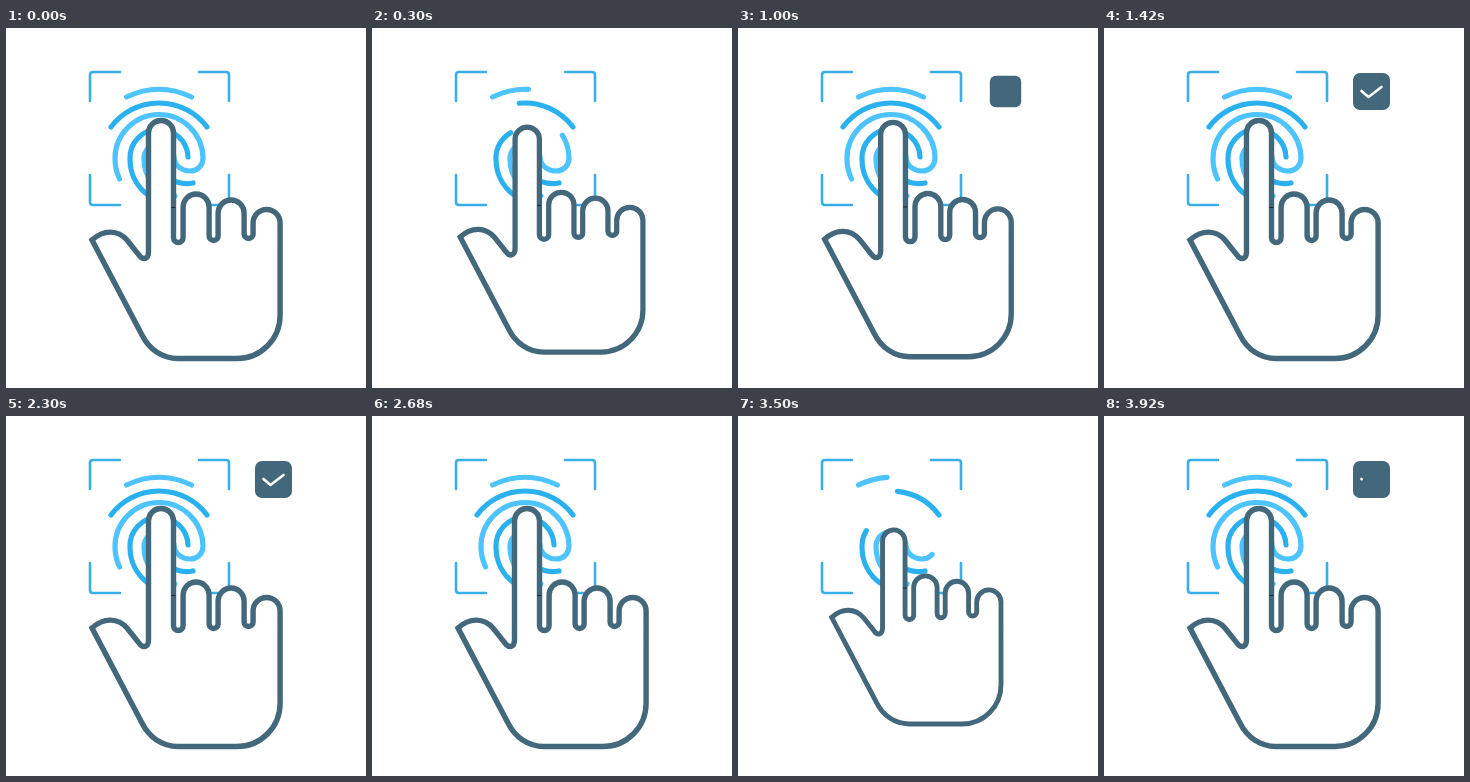
Recreate the animation shown at these times as an HTML page. Size 360 px wide and 360 px high, loop 3.94 s.

```html
<!DOCTYPE html>
<html lang="en">
<head>
<meta charset="utf-8">
<title>Fingerprint scan</title>
<style>
  html, body { margin: 0; width: 100%; height: 100%; overflow: hidden; background: #fff; }
  svg { display: block; width: 100vw; height: 100vh; }
  path { fill: none; stroke-linecap: round; stroke-linejoin: round; }
  #frame { stroke: #3aaee8; stroke-width: 2.6; }
  #print path { stroke-width: 5.2; }
  .light { stroke: #4dc3ff; }
  .dark { stroke: #2bb1f0; }
  #outline { fill: #fff; stroke: #43687b; stroke-width: 5.4; stroke-linejoin: miter; }
  #badge rect { fill: #43687b; }
  #check { stroke: #fff; stroke-width: 2.6; }
</style>
</head>
<body>
<svg viewBox="0 0 360 360">
  <path id="frame" d="M84 73V47q0-3 3-3H114M193 44H220q3 0 3 3V73M84 147V174q0 3 3 3H114M193 177H220q3 0 3-3V147"/>
  <g id="print">
    <path class="trim light" pathLength="1" d="M120.500 69Q153 53.500 185.500 69"/>
    <path class="trim dark" pathLength="1" d="M201 99A60 60 0 0 0 105 99"/>
    <path class="trim light" pathLength="1" d="M169 168C150 162 138 150 138 131A15 15 0 0 1 168 130C169 138 176 143 184 143C192 143 197 137 197 130A44 44 0 0 0 109 131Q109 141 113.500 151"/>
    <path class="trim dark" pathLength="1" d="M142 167C131 159 124 146 124 131A29 29 0 0 1 182 129"/>
    <path class="trim dark" pathLength="1" d="M187 155C170 158 153 148 153 130"/>
  </g>
  <g id="hand">
    <path id="outline"/>
    <path d="M165.500 179.500h3.500" stroke="#1d2b33" stroke-width="1"/>
  </g>
  <g id="badge">
    <rect x="249" y="45" width="37" height="37" rx="7"/>
    <path id="check" class="check" pathLength="1" d="M257.500 63L264.500 69L277.500 59"/>
  </g>
</svg>
<script>
const LOOP = 3940, CYCLE = 2860;
const $ = id => document.getElementById(id);
const trims = document.querySelectorAll('.trim');

// Smooth 0..1 progress between two times
function ease(t, start, end) {
  const u = Math.min(1, Math.max(0, (t - start) / (end - start)));
  return u * u * (3 - 2 * u);
}

function trim(path, amount) {
  path.style.visibility = amount > 0.002 ? 'visible' : 'hidden';
  path.style.strokeDasharray = amount > 0.999 ? 'none' : `${amount} 2`;
}

function scaleAbout(el, x, y, s) {
  el.setAttribute('transform', `translate(${x} ${y}) scale(${s}) translate(${-x} ${-y})`);
}

const handPath = tip => `M142.5 224V${tip}a12.5 12.5 0 0 1 25 0V209.700
  a4.8 4.8 0 0 0 9.6 0V179a13 13 0 0 1 26 0V208
  a4.5 4.5 0 0 0 9 0V185a13 13 0 0 1 26 0V206
  a4.5 4.5 0 0 0 9 0V195a13.5 13.5 0 0 1 27 0V287
  C274.200 311 255 330.500 231 330.500H172C156 330.500 143 321 136 307
  L86 212C98 201 112 202 121 212L133 227C137 233 142.500 231 142.500 224Z`;

function draw(t) {
  const lift = ease(t, 160, 560) - ease(t, 665, 1070);
  $('outline').setAttribute('d', handPath(105 + 22.4 * lift));
  scaleAbout($('hand'), 163, 105, 1 - 0.1 * lift);

  const drawn = t < 463 ? 1 - ease(t, 160, 463) : ease(t, 463, 849);
  trims.forEach(path => trim(path, drawn));

  const size = ease(t, 820, 1060) - ease(t, 2480, 2680);
  $('badge').style.visibility = size > 0 ? 'visible' : 'hidden';
  scaleAbout($('badge'), 267.5, 63.5, size);
  const ticked = ease(t, 1040, 1400);
  trim($('check'), size > 0 ? ticked : 0);
}

const begin = performance.now();
function tick() {
  draw(((performance.now() - begin) % LOOP) % CYCLE);
  requestAnimationFrame(tick);
}
tick();
</script>
</body>
</html>
```
